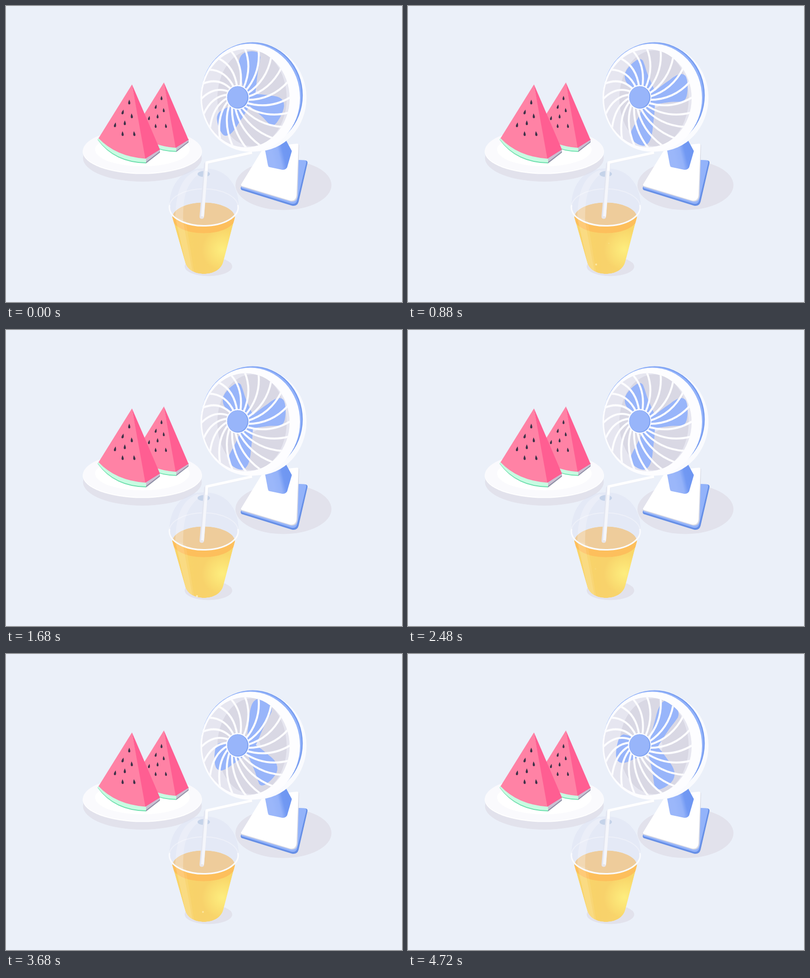
An HTML page with a canvas for the animation above (4800 ms loop, 800 by 600 pixels).

```html
<!DOCTYPE html>
<html lang="en">
<head>
<meta charset="utf-8">
<title>Summer table</title>
<style>
  html, body { margin: 0; width: 100%; height: 100%; overflow: hidden; background: #ebf0f9; }
  canvas { display: block; width: 800px; height: 600px; }
</style>
</head>
<body>
<canvas id="stage" width="800" height="600"></canvas>
<script>
const ctx = document.getElementById('stage').getContext('2d');
const LOOP = 4800, STEP = 80, SPIN = 800;
const TAU = Math.PI * 2;

function ellipse(x, y, rx, ry, color) {
  ctx.beginPath();
  ctx.ellipse(x, y, rx, ry, 0, 0, TAU);
  if (color) {
    ctx.fillStyle = color;
    ctx.fill();
  }
}

function shape(d, color) {
  ctx.fillStyle = color;
  ctx.fill(new Path2D(d));
}

function line(d, color, width, cap = 'butt') {
  ctx.strokeStyle = color;
  ctx.lineWidth = width;
  ctx.lineCap = cap;
  ctx.lineJoin = 'round';
  ctx.stroke(new Path2D(d));
}

function linear(x0, y0, x1, y1, ...stops) {
  const g = ctx.createLinearGradient(x0, y0, x1, y1);
  for (const [at, color] of stops) g.addColorStop(at, color);
  return g;
}

function plate() {
  ellipse(275.5, 308, 120, 48, '#e2e2ec');
  ellipse(275.5, 295, 120.5, 45.5, '#ffffff');
  ellipse(275.5, 293.5, 120, 45, '#fafafd');
  ellipse(275.5, 291, 95.5, 34, '#ffffff');
}

// Seeds: x, y relative to the tip of the slice, and tilt.
const seeds = [
  [-5.5, 36, 0], [-18.5, 56, .25], [-.5, 64, -.1], [-14.5, 78, 0],
  [-34, 82, .2], [-19, 100, -.05], [4.5, 100, -.15]
];

function slice(x, y, scale) {
  ctx.save();
  ctx.translate(x, y);
  ctx.scale(scale, scale);
  shape('M-69.5 112Q-36 159 28.5 160L30 148L-67 108Z', '#6fdfae');
  shape('M-69.5 111Q-35 157 28.5 158L30 146L-67 108Z', '#c8fce2');
  shape('M28.5 149L56.5 130V138L28.5 160Z', '#8e90a6');
  shape('M28.5 149L56.5 130V135.5L28.5 157Z', '#cbc0d2');
  shape('M0 0L-67.5 109Q-33 146 27 150.5L29 150Z', '#ff82a5');
  shape('M0 0L56.5 132L27 150.5Z', '#ff5e92');
  for (const [sx, sy, tilt] of seeds) {
    ctx.save();
    ctx.translate(sx, sy);
    ctx.rotate(tilt);
    shape('M0-5.2C1 -2.5 2.2 -.5 2.2 2A2.2 2.6 0 0 1-2.2 2C-2.2 -.5-1 -2.5 0-5.2Z', '#3b3147');
    ctx.restore();
  }
  ctx.restore();
}

function fanStand() {
  ellipse(560.5, 363, 97, 50.5, '#e2e2ec');
  shape('M475 366L592 313L605 313Q610 314 609 319L591 397Q588 407 577 404.5L476 373Q473 371 475 366Z', '#668fe6');
  shape('M475 365L592 312L603 312.5Q607 313 606.5 318L588 395Q585 403 576 400.5L476 369.5Z', '#93b3fa');
  shape('M474 364L520 290L589 280Q592 280 592 284L589 384Q588 399 574 396L477 367Q474 366 474 364Z', '#d5d7e3');
  shape('M475 361.5L521 286L588 279Q591 279 591 283L587 382.5Q586 397 573 394L477 365Q474 364 475 361.5Z', '#ffffff');
  shape('M523 290L564 269L577.5 294L568 327Q565 332.5 558 332L532 326.5Q530 326 529 322Z',
    linear(538, 305, 568, 298, [0, '#9bb7fa'], [.45, '#94b2f9'], [.75, '#7299f3'], [1, '#6f97f2']));
}

const BLADE = 'M14 0C15-20 16-45 18-58Q21-72 22-84Q20-95 6-97Q-8-100-22-97Q-35-94-37-80Q-38-68-30-50Q-22-25-10 0Z';

// The rotor plane is seen at an angle, so it is squashed and slightly skewed.
function blades(angle) {
  ctx.save();
  ctx.transform(.73, -.072, -.057, .97, 493, 187);
  ctx.rotate(angle);
  for (let i = 0; i < 3; i++) {
    shape(BLADE, '#98b5fa');
    ctx.rotate(TAU / 3);
  }
  ctx.restore();
}

function spokes() {
  ctx.strokeStyle = '#fdfdff';
  ctx.lineWidth = 4;
  ctx.beginPath();
  for (let i = 0; i < 20; i++) {
    const end = (i * 18 - 91) * TAU / 360;
    const bend = end + .4, start = end + .6;
    ctx.moveTo(468 + 20 * Math.cos(start), 185 + 20 * Math.sin(start));
    ctx.quadraticCurveTo(
      476 + 60 * Math.cos(bend), 186 + 66 * Math.sin(bend),
      484 + 90 * Math.cos(end), 187 + 101 * Math.sin(end));
  }
  ctx.stroke();
}

function fanHead(angle) {
  ellipse(507, 186, 100, 108.5, '#fafbfe');
  ellipse(498, 181, 101.5, 107.5, '#769cf0');
  ellipse(495.5, 181.5, 101.5, 107, '#93b3fa');
  ellipse(493.5, 186, 100.5, 109.5, '#fdfdff');

  ctx.save();
  ellipse(484.5, 187, 88.5, 99.5, '#e6e6f0');
  ctx.clip();
  ellipse(497, 187, 70, 97, '#d9d8e4');
  ellipse(495, 187, 19, 20, '#e6e6f0');
  blades(angle);
  spokes();
  ctx.restore();

  ellipse(468, 185, 23.5, 25, '#fdfdff');
  ellipse(468.3, 185.3, 21.5, 22.8, '#7ba0f2');
  ellipse(467.3, 184.7, 20.5, 22, '#98b5fa');
}

const CUP = 'M336 428L361.5 518C365 535 382 543 400 543S435 535 439 518L462.5 428A63.3 31 0 0 0 336 428Z';

// Bubbles: start time, life, x, y, velocity in px per second.
const bubbles = [
  [80, 1000, 396, 546, 12, -81],
  [560, 950, 383, 546, -9, -69],
  [1440, 1250, 388, 556, -9, -69],
  [2640, 500, 428, 549, 0, -60],
  [3300, 950, 394.5, 540, 9, -45]
];

function drawBubbles(time) {
  for (const [start, life, x, y, vx, vy] of bubbles) {
    const age = time - start;
    if (age < 0 || age >= life) continue;
    const fade = 1 - age / life, s = age / 1000;
    ellipse(x + vx * s, y + vy * s, 1.2 + fade, 1.2 + fade, `rgba(255,250,215,${.85 * fade})`);
  }
}

function cup(time) {
  ellipse(409, 528, 48, 19.5, '#e2e2ec');

  ctx.save();
  ctx.clip(new Path2D(CUP));
  shape(CUP, linear(336, 480, 462, 480, [0, '#f9d468'], [.5, '#f8d26b'], [1, '#f9d869']));
  const glow = ctx.createRadialGradient(437, 494, 2, 437, 494, 42);
  glow.addColorStop(0, 'rgba(254,242,130,.8)');
  glow.addColorStop(1, 'rgba(254,242,130,0)');
  ctx.fillStyle = glow;
  ctx.fillRect(380, 440, 90, 105);
  ellipse(399.3, 429.5, 64, 31, '#fdbf5c');
  shape('M342 428L357 432L378 545L368 545Z', 'rgba(255,255,255,.17)');
  shape('M357 432L363 434L381 545L378 545Z', 'rgba(255,255,255,.07)');
  ctx.restore();
  drawBubbles(time);

  ctx.strokeStyle = 'rgba(255,255,255,.8)';
  ctx.lineWidth = 2;
  ctx.beginPath();
  ctx.ellipse(399.5, 408, 69.5, 37.5, 0, Math.PI, TAU);
  ctx.stroke();

  const dome = 'M330 408C330 356 360 329 400 329S470 356 470 408A70 38 0 0 1 330 408Z';
  shape(dome, 'rgba(216,222,240,.42)');
  ctx.save();
  ctx.clip(new Path2D(dome));
  shape('M386 333C354 347 342 375 342 445H358C357 391 360 360 397 335Z', 'rgba(255,255,255,.24)');
  ctx.restore();
  ellipse(399.5, 340.5, 12.5, 6, '#c5d3e9');
}

function straw() {
  line('M404.5 321L395.5 427', '#e3e6f1', 9, 'round');
  line('M405.5 320L397 426', '#f5f6fb', 6, 'round');
  line('M405 334V318L497 298', '#eceef6', 6);
  line('M404.8 334L405.5 317.3L497 297', '#ffffff', 5);
  ellipse(395.3, 428.5, 3.8, 2.6, '#e9e6e9');
}

function frontRim() {
  ctx.strokeStyle = '#fafbfe';
  ctx.lineWidth = 3;
  ctx.beginPath();
  ctx.ellipse(399.5, 408, 69.5, 37.5, 0, -.12, Math.PI + .12);
  ctx.stroke();
}

function draw(time) {
  ctx.fillStyle = '#ebf0f9';
  ctx.fillRect(0, 0, 800, 600);
  plate();
  slice(319, 155, .88);
  slice(254.5, 159, 1);
  fanStand();
  fanHead(-TAU * time / SPIN);
  cup(time);
  straw();
  frontRim();
}

const begin = performance.now();
function tick() {
  const time = (performance.now() - begin) % LOOP;
  draw(Math.floor(time / STEP) * STEP);
  requestAnimationFrame(tick);
}
tick();
</script>
</body>
</html>
```
